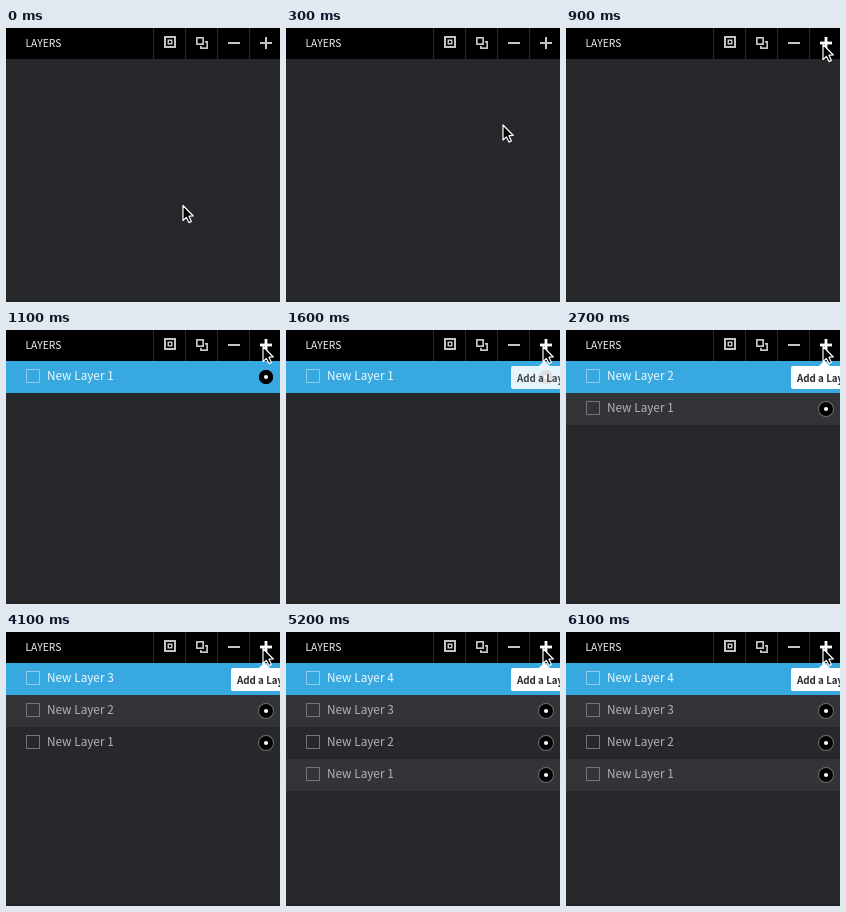
An HTML page with a canvas for the animation above (6800 ms loop, 274 by 274 pixels).

```html
<!DOCTYPE html>
<html lang="en">
<head>
<meta charset="utf-8">
<title>Layers panel</title>
<style>
  html, body { margin: 0; width: 100%; height: 100%; overflow: hidden; background: #27282c; }
  canvas { display: block; width: 274px; height: 274px; }
</style>
</head>
<body>
<canvas id="stage" width="274" height="274"></canvas>
<script>
const ctx = document.getElementById('stage').getContext('2d');
const SIZE = 274, LOOP = 6800, STEP = 100;
const HEADER = 31, ROW = 32;
const FONT = '"Noto Sans CJK JP", "Noto Sans CJK SC", "Noto Sans", sans-serif';
const ADDED = [1100, 2700, 3800, 5200];
const START = [177, 177], END = [257, 16];

const clamp = v => Math.max(0, Math.min(1, v));
const easeInOut = p => p * p * (3 - 2 * p);
const easeOut = p => 1 - (1 - p) ** 3;

function rect(x, y, w, h, color) {
  ctx.fillStyle = color;
  ctx.fillRect(x, y, w, h);
}

function box(x, y, w, h, color, line = 1) {
  ctx.strokeStyle = color;
  ctx.lineWidth = line;
  ctx.strokeRect(x + line / 2, y + line / 2, w - line, h - line);
}

function disc(x, y, r, color) {
  ctx.fillStyle = color;
  ctx.beginPath();
  ctx.arc(x, y, r, 0, Math.PI * 2);
  ctx.fill();
}

function label(text, x, y, size, weight, color) {
  ctx.font = `${weight} ${size}px ${FONT}`;
  ctx.fillStyle = color;
  ctx.fillText(text, x, y);
}

function polygon(points) {
  ctx.beginPath();
  points.forEach(([x, y]) => ctx.lineTo(x, y));
  ctx.closePath();
}

function drawHeader(hover) {
  const icon = '#c4c4c4';
  rect(0, 0, SIZE, HEADER, '#000');
  for (let x = 147; x < SIZE; x += 32) rect(x, 0, 1, HEADER, '#2b2b2c');
  label('LAYERS', 19.5, 19, 10.3, 500, '#f2f2f2');

  box(158, 8, 12, 12, icon, 2);
  box(161.5, 11.5, 5, 5, icon, 1.5);

  box(194, 13, 8, 8, icon, 1.7);
  rect(189, 8, 10, 10, '#000');
  box(190, 9, 8, 8, icon, 1.7);

  rect(222, 14, 12, 2, icon);
  const plus = hover ? '#fff' : icon;
  rect(254, 14, 12, 2, plus);
  rect(259, 9, 2, 12, plus);
  if (hover) {
    rect(254, 13.6, 12, 2.8, plus);
    rect(258.6, 9, 2.8, 12, plus);
  }
}

function drawRow(i, count) {
  const y = HEADER + i * ROW, active = i === 0;
  if (active) rect(0, y, SIZE, ROW, '#38a8e0');
  else if (i % 2) rect(0, y, SIZE, ROW, '#333437');
  box(20, y + 8, 14, 14, active ? '#8ccdee' : '#747578');
  label(`New Layer ${count - i}`, 41, y + 19, 11.8, 400, active ? '#f1f8fc' : '#b4b5b7');
  disc(260, y + 16, active ? 7 : 8, active ? '#000' : '#6c6d70');
  disc(260, y + 16, 7, '#000');
  disc(260, y + 16, 2, '#fff');
}

function drawTooltip(alpha) {
  if (!alpha) return;
  ctx.globalAlpha = alpha;
  ctx.fillStyle = '#fff';
  ctx.beginPath();
  ctx.roundRect(225, 36, 70, 23, 2);
  ctx.fill();
  polygon([[253, 36], [258.5, 30.5], [264, 36]]);
  ctx.fill();
  label('Add a Layer', 231, 51.5, 9.8, 700, '#2a2b2e');
  ctx.globalAlpha = 1;
}

function drawCursor(x, y) {
  ctx.save();
  ctx.translate(x, y);
  polygon([[0, 0.5], [0, 15.5], [3.4, 12.4], [6, 17.6], [8.4, 16.5], [6, 11.2], [10.3, 11]]);
  ctx.fillStyle = '#000';
  ctx.fill();
  ctx.strokeStyle = '#fff';
  ctx.lineWidth = 1.2;
  ctx.lineJoin = 'round';
  ctx.stroke();
  ctx.restore();
}

function draw(t) {
  rect(0, 0, SIZE, SIZE, '#27282c');
  rect(0, 272, SIZE, 1, '#201f21');
  drawHeader(t >= 600);
  const count = ADDED.filter(at => t >= at).length;
  for (let i = 0; i < count; i++) drawRow(i, count);
  drawTooltip(easeOut(clamp((t - 1400) / 400)));
  const p = easeInOut(clamp(t / 600));
  drawCursor(...START.map((v, k) => v + (END[k] - v) * p));
}

const origin = performance.now();
function tick() {
  const t = (performance.now() - origin) % LOOP;
  draw(Math.floor(t / STEP) * STEP);
  requestAnimationFrame(tick);
}
tick();
</script>
</body>
</html>
```
